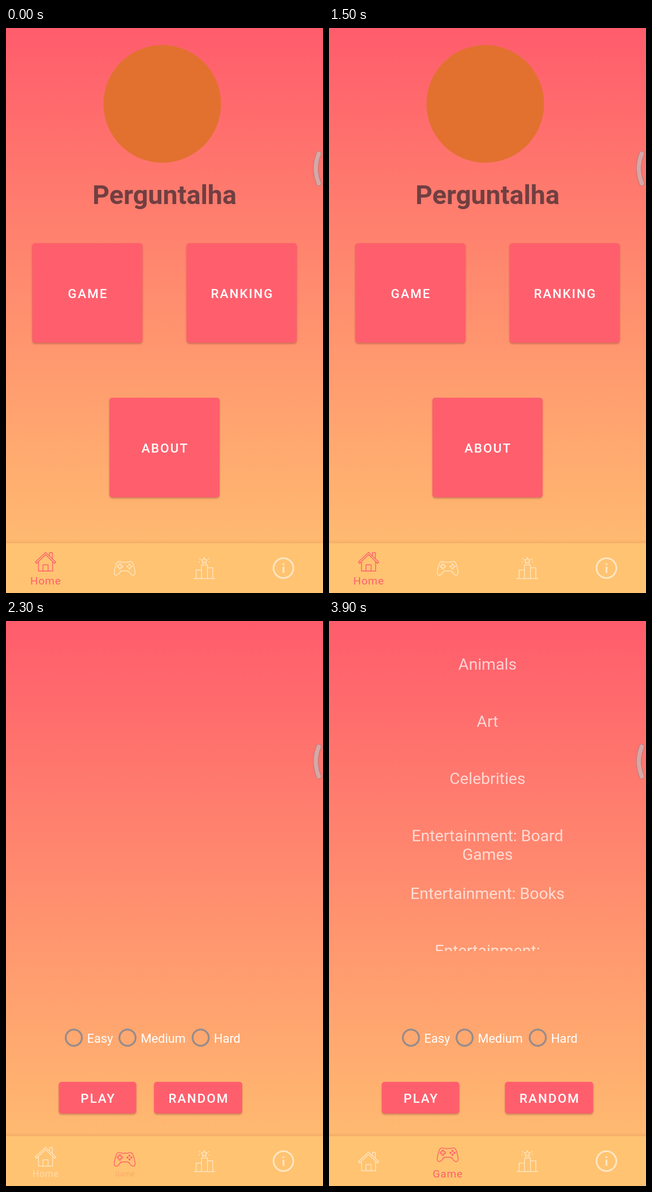
These frames come from a looping animation (561 by 998 pixels, 4000 ms). An HTML page:

```html
<!DOCTYPE html>
<html lang="en">
<head>
<meta charset="utf-8">
<title>Quiz app</title>
<style>
  html, body { margin: 0; width: 100%; height: 100%; overflow: hidden; background: #ff5f6d; }
  svg { display: block; width: 100%; height: 100%; font-family: Roboto, sans-serif; }
  .mid, .btn text, .tab text { text-anchor: middle; }
  .btn rect { fill: #ff5f6d; filter: drop-shadow(0 2px 1.5px rgba(90, 30, 20, .32)); }
  .btn text { fill: #fff; font-size: 22.5px; font-weight: 500; letter-spacing: 2.05px; }
  .list { fill: #fff; fill-opacity: .7; font-size: 28.5px; }
  .radio circle { fill: none; stroke: #978b8c; stroke-width: 3.3; }
  .radio text { fill: #fff; font-size: 21.8px; }
  .tab { color: rgba(255, 255, 255, .58); }
  .tab.on { color: #ff5f6d; }
  .tab path, .tab circle { fill: none; stroke: currentColor; stroke-width: 1.4; stroke-linejoin: round; }
  .tab text { fill: currentColor; font-size: 19px; letter-spacing: .9px; }
</style>
</head>
<body>
<svg viewBox="0 0 561 998" preserveAspectRatio="none">
  <defs>
    <linearGradient id="sky" x2="0" y2="1">
      <stop stop-color="#ff5c6c"/><stop offset="1" stop-color="#ffc371"/>
    </linearGradient>
    <linearGradient id="edge" x2="0" y2="1">
      <stop stop-color="#a05030" stop-opacity="0"/><stop offset="1" stop-color="#a05030" stop-opacity=".12"/>
    </linearGradient>
    <clipPath id="listArea"><rect width="561" height="583"/></clipPath>
  </defs>
  <rect width="561" height="998" fill="url(#sky)"/>

  <g id="home">
    <circle cx="276.5" cy="134" r="104" fill="#e2712f"/>
    <text class="mid" x="280.5" y="310.5" font-size="46.7" font-weight="700" fill="#703f41">Perguntalha</text>
  </g>

  <g id="game">
    <g id="list" class="list mid" clip-path="url(#listArea)"></g>
    <g id="radios" class="radio"></g>
  </g>

  <path d="M553.5 222Q543 248 553.5 274.5" fill="none" stroke="#b5777a" stroke-width="9.5" stroke-linecap="round"/>
  <path d="M553.5 222Q543 248 553.5 274.5" fill="none" stroke="#d8a7a5" stroke-width="7.5" stroke-linecap="round"/>

  <rect y="903" width="561" height="7" fill="url(#edge)"/>
  <rect y="910" width="561" height="88" fill="#ffc371"/>
  <g class="tab" id="homeTab">
    <g transform="translate(70 954)"><path d="M-18 1L0-16 18 1 16 3.5 0-12-16 3.5ZM-12.5 1V17H12.5V1M-4.5 17V6H4.5V17M7-10V-15.500H12V-5"/></g>
    <text x="70.300" y="982.500">Home</text>
  </g>
  <g class="tab" id="gameTab">
    <g transform="translate(210 954)">
      <path stroke-width="1.700" d="M-9-11.500Q0-9 9-11.500C14-13 16-6 18 4C20 14 14 15 9 8Q7 5 4 5H-4Q-7 5-9 8C-14 15-20 14-18 4C-16-6-14-13-9-11.500Z"/>
      <path d="M-10-7.500h3v3h3v3h-3v3h-3v-3h-3v-3h3Z"/>
      <path fill="currentColor" d="M8.500-7.500l1.300 1.300-1.300 1.300-1.300-1.300ZM8.500-.900l1.300 1.300-1.300 1.300-1.300-1.300ZM5-4.200l1.300 1.300L5-1.600 3.700-2.900ZM12-4.200l1.300 1.300L12-1.600 10.700-2.900Z"/>
    </g>
    <text x="210.300" y="982.500">Game</text>
  </g>
  <g class="tab">
    <path d="M332 972.500H370M336.500 972V957.500H346M346 972V948.500H356.500V972M356.500 953.500H366V972M351 935.500l1.600 3.500 3.800.4-2.800 2.600.8 3.800-3.400-2-3.400 2 .8-3.800-2.800-2.600 3.800-.4ZM342 937l2 1M360 937l-2 1M341 943h2M359 943h2"/>
  </g>
  <g class="tab">
    <circle cx="491" cy="954" r="17.500" style="stroke-width:3"/>
    <path d="M491 945.500v3M491 951.500v11" style="stroke-width:3.200"/>
  </g>
</svg>
<script>
const $ = id => document.getElementById(id);
const clamp = v => Math.min(1, Math.max(0, v));
const addTo = (id, markup) => $(id).insertAdjacentHTML('beforeend', markup);

const button = (label, x, y, w, h) =>
  `<g class="btn" id="${label}"><rect x="${x}" y="${y}" width="${w}" height="${h}" rx="5"/>` +
  `<text x="${x + w / 2 + 1}" y="${y + h / 2 + 9}">${label}</text></g>`;

addTo('home', button('GAME', 46.5, 380, 195, 176) + button('RANKING', 319.5, 380, 195, 176) +
  button('ABOUT', 183, 653, 195, 176));
addTo('game', button('PLAY', 93.5, 814, 137, 56) + button('RANDOM', 262, 814, 156, 56));

['Animals', 'Art', 'Celebrities', 'Entertainment: Board|Games', 'Entertainment: Books', 'Entertainment:']
  .forEach((topic, row) => topic.split('|').forEach((line, i) =>
    addTo('list', `<text x="280.5" y="${85.5 + row * 101.3 + i * 33}">${line}</text>`)));

[['Easy', 120], ['Medium', 215], ['Hard', 344.5]].forEach(([label, x]) =>
  addTo('radios', `<circle cx="${x}" cy="736" r="14.3"/><text x="${x + 23.5}" y="745">${label}</text>`));

// focus: 1 = raised icon with full label, 0 = centred icon without label
function setTab(tab, focus, active) {
  tab.classList.toggle('on', active);
  const [icon, label] = tab.children;
  const x = +label.getAttribute('x');
  icon.setAttribute('transform', `translate(${Math.round(x)} ${954 - 11.7 * focus})`);
  const scale = .5 + .5 * focus;
  label.setAttribute('transform', `translate(${x} 977) scale(${scale}) translate(${-x} -977)`);
  label.setAttribute('opacity', focus);
}

function draw(t) {
  const playing = t >= 2300, loaded = t >= 3300;
  $('home').style.display = playing ? 'none' : '';
  $('game').style.display = playing ? '' : 'none';
  $('list').style.display = loaded ? '' : 'none';
  $('radios').setAttribute('transform', `translate(${loaded ? 25 : 0})`);
  $('RANDOM').setAttribute('transform', `translate(${loaded ? 49.5 : 0})`);

  const press = clamp((t - 2000) / 200);
  const face = $('GAME').firstChild;
  face.style.fill = `color-mix(in srgb, #ff828e ${press * 100}%, #ff5f6d)`;
  face.style.filter = press ? `drop-shadow(0 ${2 + 3 * press}px ${1.5 + 3 * press}px rgba(90,30,20,.36))` : '';

  const swap = clamp((t - 2250) / 170);
  setTab($('homeTab'), 1 - swap, !playing);
  setTab($('gameTab'), swap, playing);
}

// The screen refreshes ten times a second
const start = performance.now();
function tick() {
  draw(Math.floor((performance.now() - start) % 4000 / 100) * 100);
  requestAnimationFrame(tick);
}
tick();
</script>
</body>
</html>
```
